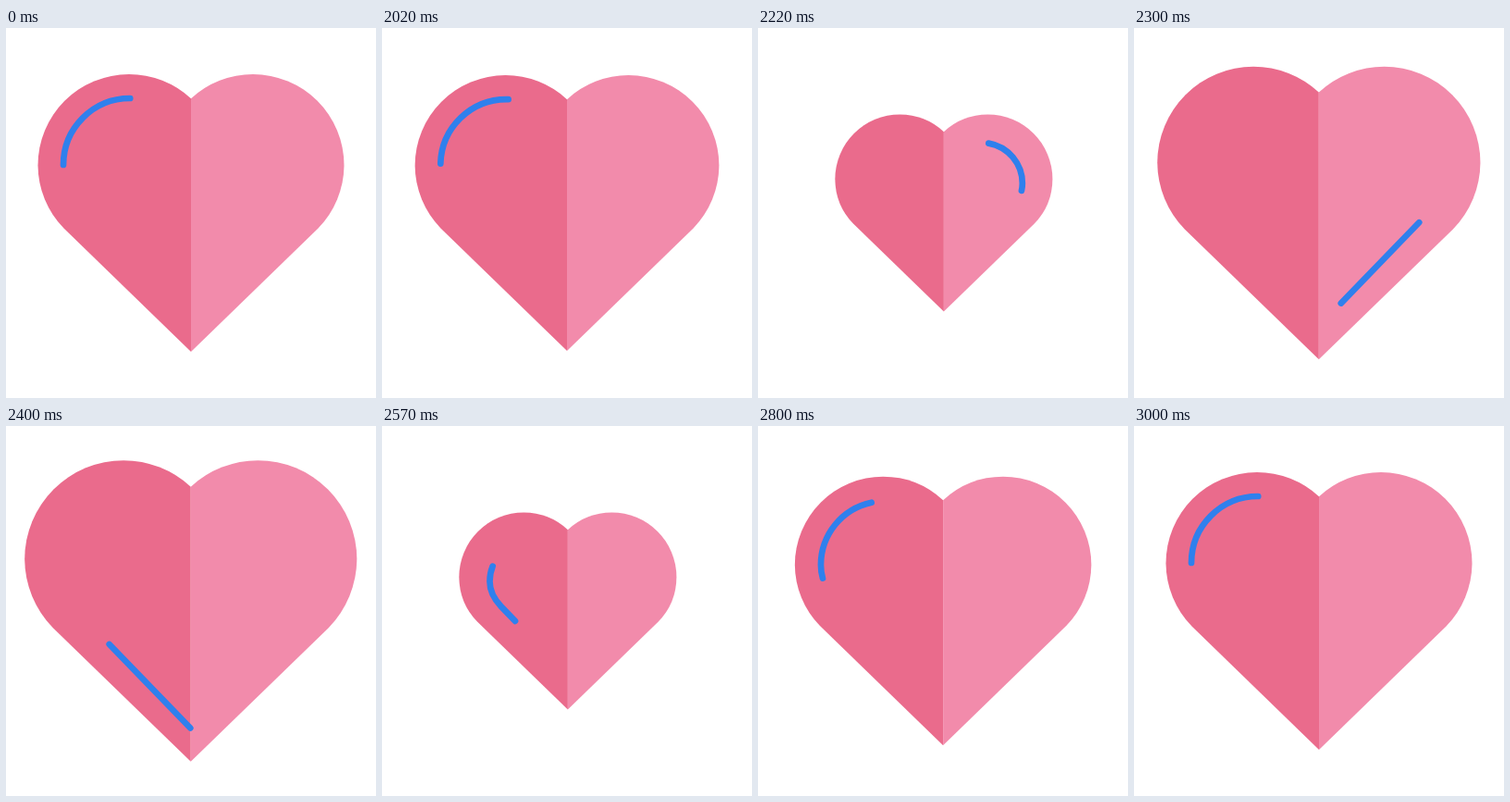
Write an HTML page that moves like this. It is 400 by 400 pixels and loops after 3.02 s.

```html
<!DOCTYPE html>
<html lang="en">
<head>
<meta charset="utf-8">
<title>Heartbeat</title>
<style>
  html, body { margin: 0; width: 100%; height: 100%; overflow: hidden; background: #fff; }
  svg { display: block; width: 100vw; height: 100vh; }
  #shine {
    fill: none;
    stroke: #2f80ed;
    stroke-linecap: round;
    stroke-linejoin: round;
    stroke-dasharray: 113 717;
  }
</style>
</head>
<body>
<svg viewBox="0 0 400 400">
  <g id="heart">
    <path id="half" fill="#ea6b8c" d="M200 76.3 A98.5 98.5 0 0 0 133 50 A98.5 98.5 0 0 0 34.5 148.5 A98.5 98.5 0 0 0 62.5 216.5 L200 350Z"/>
    <path id="mirror" fill="#f28bab" transform="matrix(-1 0 0 1 400 0)"/>
  </g>
  <path id="shine" pathLength="830" d="M62 148 A72 72 0 0 1 134 76 A72 72 0 0 1 200 119.2 A72 72 0 0 1 266 76 A72 72 0 0 1 338 148 C338 165 330.5 179 318 192 L200 314 L82 192 C69.5 179 62 165 62 148Z"/>
</svg>
<script>
  const LOOP = 3020, REST = 2000, STEP = 25, LAST = 40;
  const LENGTH = 830, STROKE = 6.7;
  const heart = document.getElementById('heart');
  const shine = document.getElementById('shine');
  document.getElementById('mirror').setAttribute('d', document.getElementById('half').getAttribute('d'));

  // Cubic easing with handles (a, 0) and (c, 1)
  const ease = (a, c) => x => {
    let lo = 0, hi = 1;
    for (let i = 0; i < 30; i++) {
      const u = (lo + hi) / 2, v = 1 - u;
      if (3 * a * u * v * v + 3 * c * u * u * v + u * u * u < x) lo = u; else hi = u;
    }
    return lo * lo * (3 - 2 * lo);
  };
  const glide = ease(0.32, 0.08);
  const squeeze = ease(0.5, 0.3);

  // Beat: time in ms, scale, easing towards this key
  const beat = [
    [0, 1],
    [212, 0.7, squeeze],
    [382, 1.114, glide],
    [534, 0.7, glide],
    [1000, 1, glide]
  ];

  function scaleAt(ms) {
    const i = Math.max(1, beat.findIndex(key => key[0] >= ms));
    const [t0, s0] = beat[i - 1], [t1, s1, curve] = beat[i];
    return s0 + (s1 - s0) * curve((ms - t0) / (t1 - t0));
  }

  const zoom = s => `translate(203 200) scale(${s}) translate(-203 -200)`;

  function draw(now) {
    // The motion advances in 25 ms steps, shown on a 10 ms clock
    const tick = Math.floor((now % LOOP - REST) / 10);
    const step = Math.min(LAST, Math.max(0, Math.floor((tick + 0.5) / 2.5)));
    const ms = step * STEP;
    const size = scaleAt(ms);
    const inner = 1 + (size - 1) * 4 / 3;
    const along = step === LAST ? 0 : glide(ms / 1000) * LENGTH;
    heart.setAttribute('transform', zoom(size));
    shine.setAttribute('transform', zoom(inner));
    shine.style.strokeWidth = STROKE / inner;
    shine.style.strokeDashoffset = -along;
  }

  const start = performance.now();
  function loop() {
    draw(performance.now() - start);
    requestAnimationFrame(loop);
  }
  loop();
</script>
</body>
</html>
```
